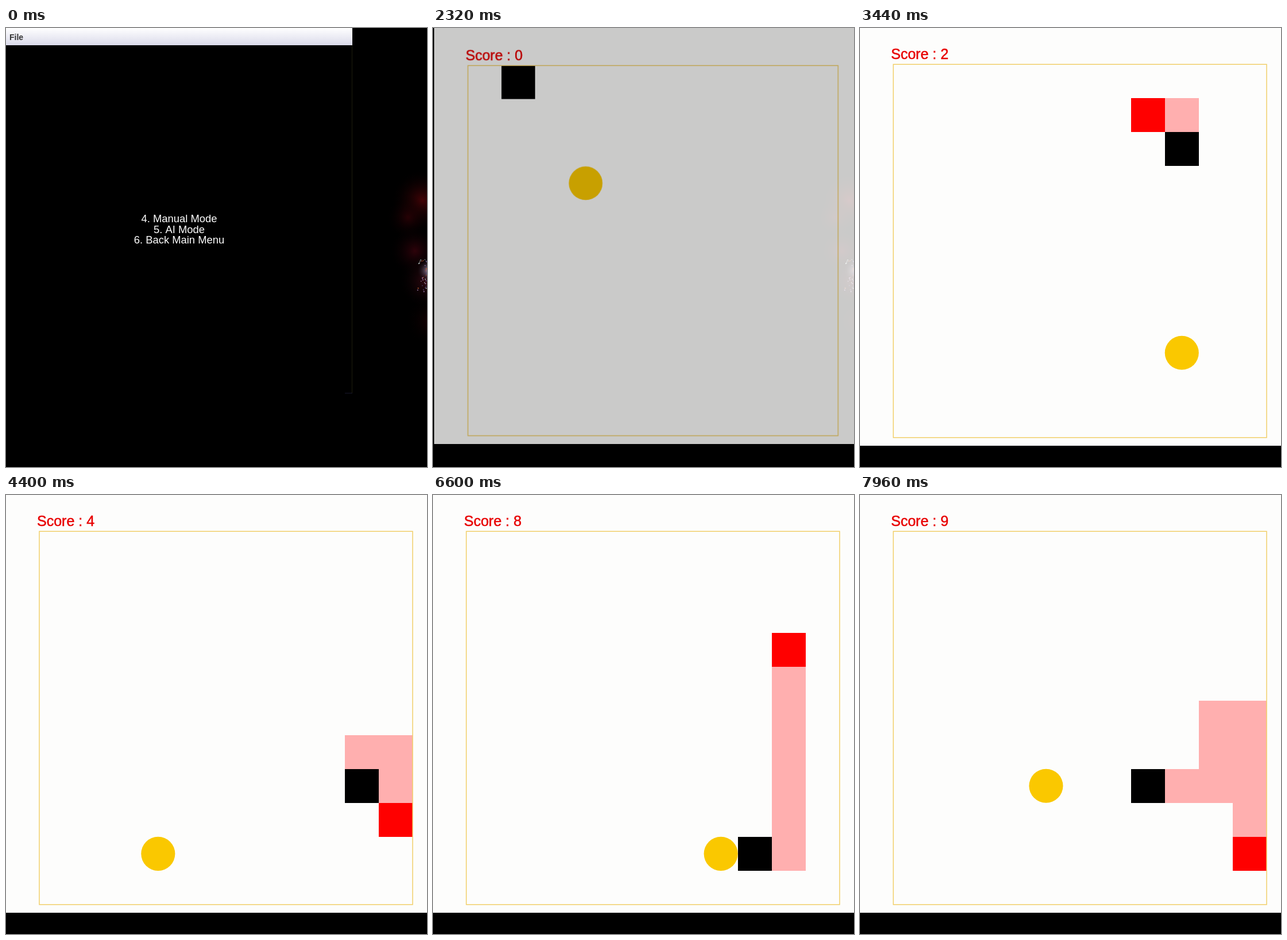
Recreate the animation shown at these times as an HTML page with a canvas. Size 733 by 764 pixels, loop 8000 ms.

```html
<!DOCTYPE html>
<html lang="en">
<head>
<meta charset="utf-8">
<title>Snake</title>
<style>
  html, body { margin: 0; height: 100%; overflow: hidden; background: #000; }
  canvas { display: block; }
</style>
</head>
<body>
<canvas id="stage" width="733" height="764"></canvas>
<script>
const LOOP = 8000, STEP = 77, CELL = 650 / 11, LEFT = 58, TOP = 63;
const ctx = document.getElementById('stage').getContext('2d');

// The game window is painted apart so that it can fade and scale as one.
const WIN = { x: -1, y: -101, w: 768, h: 828, cx: 383, cy: 313 };
const game = Object.assign(document.createElement('canvas'), { width: WIN.w, height: WIN.h });
const g = game.getContext('2d');
g.translate(-WIN.x, -WIN.y);

// Route of the head: direction and number of cells.
const DIRS = { U: [0, -1], D: [0, 1], L: [-1, 0], R: [1, 0] };
const route = [[1, 0]];
for (const [, dir, count] of 'D3R2U2R5D7R2U2L1D3L6U7R6D7L3D1R4U5L1D2L5'.matchAll(/(\D)(\d)/g)) {
  for (let i = 0; i < count; i++) {
    const [x, y] = route[route.length - 1];
    route.push([x + DIRS[dir][0], y + DIRS[dir][1]]);
  }
}
const meals = [5, 12, 19, 23, 33, 46, 49, 54, 55, 74];

const clamp = (v, lo, hi) => Math.min(hi, Math.max(lo, v));

function text(c, str, x, y, font, color, align = 'left') {
  c.font = font + ' "Liberation Sans", Arial, sans-serif';
  c.textAlign = align;
  c.fillStyle = c.strokeStyle = color;
  c.fillText(str, x, y);
}

function glow(x, y, r, color) {
  const grad = ctx.createRadialGradient(x, y, 0, x, y, r);
  grad.addColorStop(0, color);
  grad.addColorStop(1, 'rgba(0,0,0,0)');
  ctx.fillStyle = grad;
  ctx.fillRect(x - r, y - r, 2 * r, 2 * r);
}

function drawDesktop() {
  ctx.fillStyle = '#000';
  ctx.fillRect(0, 0, 733, 764);
  glow(725, 300, 55, 'rgba(90,4,8,.75)');
  glow(700, 330, 38, 'rgba(60,2,8,.6)');
  glow(712, 388, 45, 'rgba(65,3,14,.7)');
  glow(733, 440, 50, 'rgba(75,12,25,.7)');
  glow(740, 510, 45, 'rgba(40,2,6,.6)');
  glow(735, 422, 20, 'rgba(200,180,220,.75)');
  let seed = 7;
  const rnd = () => (seed = seed * 16807 % 2147483647) / 2147483647;
  const colors = ['#cdd', '#a8b', '#558', '#a53'];
  for (let i = 0; i < 34; i++) {
    ctx.fillStyle = colors[i % 4];
    ctx.fillRect(733 - 20 * rnd() * rnd(), 402 + 56 * rnd(), 1 + rnd(), 1 + rnd());
  }
}

function drawMenu(t) {
  ctx.globalAlpha = clamp((2200 - t) / 160, 0, 1);
  ctx.fillStyle = '#000';
  ctx.fillRect(0, 0, 603, 636);
  const bar = ctx.createLinearGradient(0, 0, 0, 30);
  bar.addColorStop(0, '#fff');
  bar.addColorStop(1, '#dadaea');
  ctx.fillStyle = bar;
  ctx.fillRect(0, 0, 603, 30);
  ctx.fillStyle = '#1c1c0c';
  ctx.fillRect(602, 30, 1, 606);
  ctx.fillStyle = '#18182c';
  const edge = t < 1160 ? 590 : 0;
  ctx.fillRect(edge, 635, 603 - edge, 1);
  text(ctx, 'File', 6, 21, 'bold 14px', '#333');
  ['4. Manual Mode', '5. AI Mode', '6. Back Main Menu'].forEach((line, i) =>
    text(ctx, line, 301.5, 338 + 18.5 * i, '18.4px', '#fff', 'center'));
  ctx.globalAlpha = 1;
}

function drawCell([x, y], color) {
  const x0 = Math.round(LEFT + x * CELL), y0 = Math.round(TOP + y * CELL);
  g.fillStyle = color;
  g.fillRect(x0, y0, Math.round(LEFT + (x + 1) * CELL) - x0, Math.round(TOP + (y + 1) * CELL) - y0);
}

function drawGame(t) {
  const step = clamp(Math.floor((t - 2320) / STEP + 0.6) - 2, 0, route.length - 1);
  const score = meals.filter(m => m <= step).length;
  const tail = step - meals.filter(m => m < step).length;

  g.fillStyle = '#fdfdfc';
  g.fillRect(WIN.x, WIN.y, WIN.w, WIN.h);
  text(g, 'Score : ' + score, 54, 54, '25px', '#e80000');
  g.lineWidth = 0.5;
  g.strokeText('Score : ' + score, 54, 54);

  const food = route[meals[score]];
  if (food) {
    g.fillStyle = '#fac800';
    g.beginPath();
    g.arc(LEFT + (food[0] + 0.5) * CELL, TOP + (food[1] + 0.5) * CELL, CELL / 2, 0, 7);
    g.fill();
  }
  for (let i = Math.max(0, tail); i <= step; i++) {
    drawCell(route[i], i === step ? '#000' : i === tail ? '#f00' : '#ffafaf');
  }
  g.strokeStyle = '#f0cc60';
  g.lineWidth = 1.4;
  g.strokeRect(LEFT, TOP + 0.3, 650, 649.5);

  const left = Math.pow(1 - clamp((t - 2200) / 240, 0, 1), 2.3);
  const scale = 1 - 0.042 * left;
  ctx.save();
  ctx.globalAlpha = 1 - left;
  ctx.translate(WIN.cx, WIN.cy);
  ctx.scale(scale, scale);
  ctx.drawImage(game, WIN.x - WIN.cx, WIN.y - WIN.cy);
  ctx.restore();
}

function frame() {
  const t = performance.now() % LOOP;
  drawDesktop();
  if (t < 2200) drawMenu(t);
  else drawGame(t);
  requestAnimationFrame(frame);
}
frame();
</script>
</body>
</html>
```
